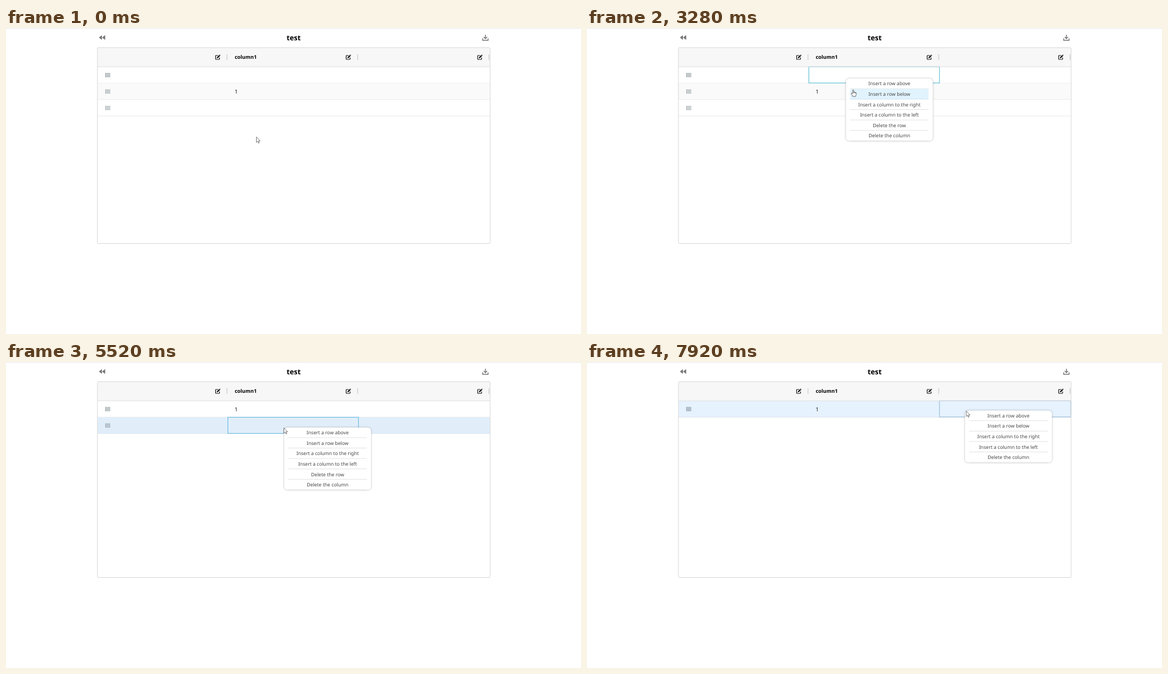
These frames come from a looping animation (1025x546 px, 8000 ms). An HTML page:

```html
<!DOCTYPE html>
<html lang="en">
<head>
<meta charset="utf-8">
<title>Table context menu</title>
<style>
  html, body { margin: 0; width: 100%; height: 100%; overflow: hidden; background: #fff; }
  svg { display: block; width: 100%; height: 100%; font-family: "Noto Sans", "Open Sans", sans-serif; text-rendering: geometricPrecision; }
  .menu { filter: drop-shadow(0 0 1.5px rgba(0, 0, 0, .32)); }
  .item { font-size: 8.6px; fill: #444; text-anchor: middle; }
  .cell { font-size: 9.8px; fill: #222; }
  .head { font-size: 9.1px; font-weight: 700; }
  .title { font-size: 12.8px; font-weight: 700; text-anchor: middle; }
</style>
</head>
<body>
<svg viewBox="0 0 1025 546">
  <defs>
    <g id="edit">
      <path d="M.5-3H-3.2Q-4-3-4-2.2V3.2Q-4 4-3.2 4H2.2Q3 4 3 3.2V.8" fill="none" stroke="#111" stroke-width="1.2"/>
      <path d="M-1.8 2L-1.6.2L2.3-3.7L3.9-2.1L0 1.8ZM2.7-4.1L3.3-4.7L4.9-3.1L4.3-2.5Z" fill="#111"/>
    </g>
    <path id="handle" d="M0 .5H8.4M0 2.5H8.4M0 4.5H8.4M0 6.5H8.4" stroke="#607075" stroke-dasharray="1.2 1.2" stroke-width="1.3"/>
    <path id="arrow" d="M.4.4V10.2L2.6 8.1L4.1 11.6L5.6 10.9L4.1 7.6H7.1Z" fill="#fff" stroke="#555" stroke-width=".8"/>
    <path id="hand" d="M-.9 7.4V1.4Q-.9.4 0 .4T.9 1.4V4.5Q1.8 3.9 2.5 4.8Q3.4 4.3 4 5.2Q5.3 4.9 5.3 6.2V8.6Q5.3 10 4.4 11V12.3H-1V11.2L-3.6 7.6Q-3.9 6.4-2.7 6.2Q-1.8 6.3-.9 7.4ZM.9 4.5V6.4M2.5 4.8V6.5M4 5.2V6.7" fill="#fff" stroke="#444" stroke-width=".8"/>
  </defs>
  <path d="M0 .5H1025" stroke="#e8e8e8"/>
  <path d="M171 12.8V21.2L165.6 17ZM176.8 12.8V21.2L171.2 17Z" fill="#777"/>
  <text class="title" x="512.7" y="21.6">test</text>
  <path d="M849.8 18.5V22H859.4V18.5M854.6 12V18.6M851.6 16L854.6 19L857.6 16" fill="none" stroke="#777" stroke-width="1.5"/>
  <path d="M163 69V37Q163 35 165 35H861Q863 35 863 37V69Z" fill="#f7f7f7"/>
  <g id="scene"></g>
  <path d="M163 69.2H863" stroke="#dedede"/>
  <rect x="163" y="35" width="700" height="349.5" rx="2" fill="none" stroke="#d6d6d6"/>
  <path d="M394 47V57M627 47V57M861 47V57" stroke="#ccc" stroke-width="1.3"/>
  <use href="#edit" x="377.6" y="52"/>
  <use href="#edit" x="610.4" y="52"/>
  <use href="#edit" x="844.8" y="52"/>
  <text class="head" x="407.7" y="55.1">column1</text>
  <g id="overlay"></g>
</svg>
<script>
const LOOP = 8000, TICK = 80;
const TOP = 69.3, ROW = 29.3, ITEM = 18.6, MENU_WIDTH = 155;
const COLUMNS = [163, 395.5, 628.3, 862.4];
const ITEMS = ['Insert a row above', 'Insert a row below', 'Insert a column to the right',
  'Insert a column to the left', 'Delete the row', 'Delete the column'];

// Pointer moves with ease-out; each rests at its end point.
const moves = [
  { start: 0, end: 960, from: [446, 194], to: [462, 90], power: 1.89 },
  { start: 3200, end: 3840, from: [462, 90], to: [515.5, 174.5], power: 2 },
  { start: 4720, end: 5280, from: [515.5, 174.5], to: [495, 117], power: 2.4 },
  { start: 5920, end: 6480, from: [495, 117], to: [548, 197], power: 2.85 },
  { start: 6960, end: 7680, from: [548, 197], to: [675.7, 87], power: 2 },
];
const menus = [
  { start: 2400, end: 4320, x: 461.5, y: 90, items: ITEMS },
  { start: 5520, end: 6800, x: 495.8, y: 116.7, items: ITEMS },
  { start: 7920, end: LOOP, x: 673.8, y: 86.4, items: ITEMS.filter(s => s !== 'Delete the row') },
];
const focuses = [
  { start: 2240, end: 3840, column: 1, row: 0, color: '#4cb8d2' },
  { start: 5280, end: 6480, column: 1, row: 1, color: '#5bb4de' },
  { start: 7680, end: LOOP, column: 2, row: 0, color: '#8fb3d0' },
];

const scene = document.getElementById('scene');
const overlay = document.getElementById('overlay');
const activeAt = (list, t) => list.find(e => t >= e.start && t < e.end);
const rect = (x, y, w, h, attrs) => `<rect x="${x}" y="${y}" width="${w}" height="${h}" ${attrs}/>`;
const line = (x, y, w, color) => `<path d="M${x} ${y}h${w}" stroke="${color}"/>`;
const text = (name, x, y, s) => `<text class="${name}" x="${x}" y="${y}">${s}</text>`;

function pointerAt(t) {
  const { start, end, from, to, power } = moves.filter(m => m.start <= t).pop();
  const p = Math.min(1, (t - start) / (end - start));
  const eased = 1 - (1 - p) ** power;
  return from.map((v, i) => v + (to[i] - v) * eased);
}

function drawTable(t, hoverRow) {
  const rows = t < 4320 ? 3 : t < 6800 ? 2 : 1;
  const valueRow = t < 4320 ? 1 : 0;
  let out = '';
  for (let i = 0; i < rows; i++) {
    const y = TOP + i * ROW, odd = i % 2;
    const fill = i === hoverRow ? (odd ? '#e1eefa' : '#e6f2fe') : (odd ? '#fafafa' : '#fff');
    out += rect(163, y, 700, ROW, `fill="${fill}"`) + line(163, y + ROW - .3, 700, i === hoverRow ? '#dce6ee' : '#e9e9e9');
    out += `<use href="#handle" x="177" y="${y + 11.2}"/>`;
    if (i === valueRow) out += text('cell', 407.5, y + 18.8, '1');
  }
  const focus = activeAt(focuses, t);
  if (focus) {
    const x = COLUMNS[focus.column];
    out += rect(x, TOP + focus.row * ROW, COLUMNS[focus.column + 1] - x, ROW - .5,
      `fill="none" stroke="${focus.color}"`);
  }
  return out;
}

function drawMenu({ x, y, items }, hoverItem) {
  let out = rect(x, y, MENU_WIDTH, items.length * ITEM, 'rx="6" fill="#fff" class="menu"');
  items.forEach((label, i) => {
    const top = y + i * ITEM, hovered = i === hoverItem;
    if (hovered) out += rect(x + 7.5, top, 140, ITEM, 'rx="3" fill="#e1f3fd"');
    out += line(x + 7.5, top + ITEM - .3, 140, hovered ? '#cfe3ee' : '#e2e2e2');
    out += text('item', x + MENU_WIDTH / 2, top + 12.4, label);
  });
  return out;
}

function draw(t) {
  const [x, y] = pointerAt(t);
  const menu = activeAt(menus, t);
  const overMenu = menu && x > menu.x + 7;
  const hoverItem = overMenu ? Math.floor((y - menu.y) / ITEM) : -1;
  const hoverRow = overMenu ? -1 : Math.floor((y - TOP) / ROW);
  scene.innerHTML = drawTable(t, hoverRow);
  overlay.innerHTML = (menu ? drawMenu(menu, hoverItem) : '') +
    `<use href="#${overMenu ? 'hand' : 'arrow'}" x="${x}" y="${y}"/>`;
}

let shown = -1;
function frame() {
  const t = Math.floor(performance.now() % LOOP / TICK) * TICK;
  if (t !== shown) draw(shown = t);
  requestAnimationFrame(frame);
}
frame();
</script>
</body>
</html>
```
